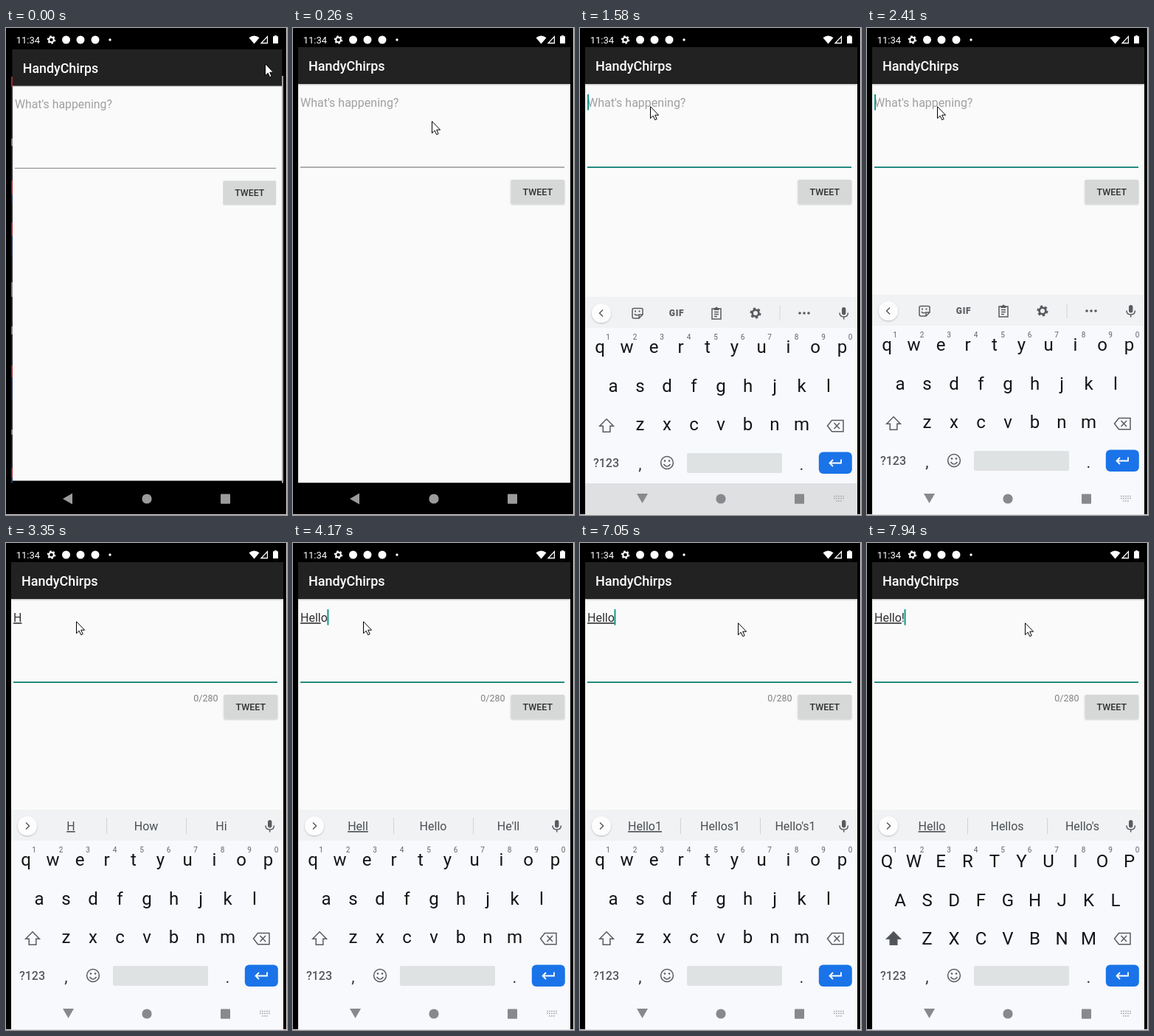
An HTML page that plays this animation: 381x661 px, repeating every 8000 ms.

```html
<!DOCTYPE html>
<html lang="en">
<head>
<meta charset="utf-8">
<title>Composing a post</title>
<style>
html, body { margin: 0; width: 100%; height: 100%; overflow: hidden; background: #000; }
svg { display: block; width: 381px; height: 661px; font-family: Roboto, sans-serif; }
.mid { text-anchor: middle; }
.line { fill: none; stroke: #585b5f; stroke-width: 1.5; }
.under { text-decoration: underline 1px #777; }
#letters text { font-size: 24px; fill: #131416; }
#digits text { font-size: 10px; fill: #5f6368; }
#words text { font-size: 16px; fill: #4b4e52; }
</style>
</head>
<body>
<svg viewBox="0 0 381 661">
  <defs>
    <filter id="shade" x="-20%" y="-20%" width="140%" height="150%">
      <feDropShadow dx="0" dy="1" stdDeviation="0.8" flood-opacity=".25"/>
    </filter>
    <clipPath id="panel"><path d="M7 340H376V618H7Z"/></clipPath>
    <g id="gear" fill="none" stroke="currentColor">
      <circle r="4.4" stroke-width="2.8"/>
      <circle r="6.4" stroke-width="2.2" pathLength="12" stroke-dasharray="1 1"/>
    </g>
  </defs>

  <rect width="381" height="661"/>
  <path d="M380.5 0V661M0 660.5H381" stroke="#e6dde0"/>

  <g id="behind">
    <path d="M375 65V630" stroke="#a3a3a3" stroke-width="2"/>
    <path d="M8 80V614" stroke="#25272b" stroke-width="2"/>
    <path d="M8 66V80M8 207V226M8 264V282M8 458V474M8 597V610" stroke="#9c2630" stroke-width="2"/>
    <path d="M8 226V238M8 282V310M8 474V504M8 610V630" stroke="#1d3260" stroke-width="2"/>
    <path d="M8 150V160M8 345V365M8 405V416M8 545V552" stroke="#77797d" stroke-width="2"/>
  </g>

  <g id="screen">
    <path d="M7 26H376V617.5H7Z" fill="#fafafa"/>
    <path d="M7 26H376V76H7Z" fill="#212121" filter="url(#shade)"/>
    <text x="21" y="58.3" font-size="18" font-weight="500" fill="#fff">HandyChirps</text>
    <text id="hint" x="10" y="107" font-size="16" fill="#a0a0a0">What's happening?</text>
    <text id="entry" x="10" y="107" font-size="16" fill="#303030"><tspan id="marked" class="under"></tspan><tspan id="plain"></tspan></text>
    <path id="rule" d="M10 189H368"/>
    <rect id="caret" y="90" width="2" height="21.5" fill="#12988a"/>
    <text id="count" x="287.5" y="214.5" font-size="12.5" text-anchor="end" fill="#808080">0/280</text>
    <rect x="295.5" y="206" width="72.5" height="32.5" rx="1.5" fill="#d6d7d7" filter="url(#shade)"/>
    <text class="mid" x="331.8" y="227" font-size="12.5" font-weight="500" fill="#303030">TWEET</text>
  </g>

  <g fill="#fff">
    <text x="13.7" y="20.6" font-size="13">11:34</text>
    <use href="#gear" transform="translate(61.5 16) scale(.76)" color="#fff"/>
    <circle cx="81.5" cy="16" r="5.5"/><circle cx="101" cy="16" r="5.5"/><circle cx="121" cy="16" r="5.5"/>
    <circle cx="141" cy="16" r="1.7"/>
    <path d="M329.5 13.2Q336.5 8 343.5 13.2L336.5 21.5Z"/>
    <path d="M346 20.5H354.4V11.6Z" fill="none" stroke="#fff" stroke-width="1.3"/>
    <path d="M364 10H367V11.3H369V21H362V11.3H364Z"/>
  </g>

  <rect id="navBack" x="7" y="617.5" width="369" height="42.5"/>
  <g id="board" clip-path="url(#panel)">
    <g id="keys">
      <path d="M7 362H376V404H7Z" fill="#f0f2f3"/>
      <path d="M7 404H376V620H7Z" fill="#f8f9fc"/>
      <circle cx="29" cy="384" r="13" fill="#fdfdfe" filter="url(#shade)"/>
      <path id="chevron" class="line"/>
      <g id="tools" color="#585b5f">
        <path class="line" d="M73 377.5H83Q85 377.5 85 379.5V386L80 391H73Q71 391 71 389V379.5Q71 377.5 73 377.5ZM85 386H80V391M74 385Q76 388 79 386"/>
        <path d="M74 380.5h2v2h-2zM79.5 380.5h2v2h-2z" fill="#585b5f"/>
        <text class="mid" x="131" y="388.3" font-size="12" font-weight="800" letter-spacing=".7" fill="#585b5f">GIF</text>
        <path class="line" d="M179 378H191V392H179ZM182 382.5H188M182 385.5H188M182 388.5H186"/>
        <path d="M181.5 377H183Q185 374 187 377H188.5V380H181.5Z" fill="#585b5f"/>
        <use href="#gear" x="238" y="384"/>
        <path d="M271 374V394" stroke="#d3d5d8"/>
        <g fill="#585b5f"><circle cx="298" cy="384" r="1.8"/><circle cx="304" cy="384" r="1.8"/><circle cx="310" cy="384" r="1.8"/></g>
      </g>
      <g id="words">
        <path d="M136.5 373V395M244.5 373V395" stroke="#d0d3d6"/>
        <text class="mid under" x="88" y="390"></text>
        <text class="mid" x="190" y="390"></text>
        <text class="mid" x="292" y="390"></text>
      </g>
      <rect x="355" y="376" width="5.4" height="10.5" rx="2.7" fill="#585b5f"/>
      <path class="line" d="M352 383.5Q352 389 357.7 389Q363.4 389 363.4 383.5M357.7 389V392.5"/>
      <g id="letters"></g>
      <g id="digits"></g>
      <path id="shift" class="line" d="M36 527.8L45.3 537.3H40.8V545.3H31.2V537.3H26.7Z"/>
      <path class="line" d="M335.5 537L341.5 529.5H357V544.7H341.5ZM344.5 533L352 541M352 533L344.5 541"/>
      <text class="mid" x="35.5" y="593" font-size="16" font-weight="500" fill="#55585c">?123</text>
      <text class="mid" x="81.5" y="596" font-size="22" fill="#333">,</text>
      <text class="mid" x="300.5" y="597" font-size="22" fill="#333">.</text>
      <circle class="line" cx="118" cy="587" r="8.4"/>
      <path class="line" d="M113.5 589Q118 595 122.5 589"/>
      <g fill="#585b5f"><circle cx="115" cy="584.5" r="1.3"/><circle cx="121" cy="584.5" r="1.3"/></g>
      <rect x="145" y="574" width="129" height="27" rx="2" fill="#dfe2e3"/>
      <rect x="323.8" y="572.6" width="45" height="29.5" rx="6" fill="#1a73e8"/>
      <path d="M354 582.5V587.5H339M343 583L338.5 587.5L343 592" fill="none" stroke="#fff" stroke-width="1.8"/>
    </g>
  </g>

  <g id="nav">
    <path id="back"/>
    <circle cx="191" cy="639" r="6.6"/>
    <rect x="291" y="632.5" width="13" height="13.2" rx=".8"/>
    <path id="switcher" d="M344 635.5H358M344 638.5H358M347 642H355" fill="none" stroke="#a9abae" stroke-width="1.6" stroke-dasharray="1.8 1.2"/>
  </g>

  <path id="pointer" d="M.5 .7V16.7L4.2 13.2L6.7 18.7L9.2 17.6L6.7 12.2H11.6Z" fill="#fff" stroke="#000"/>
</svg>

<script>
const LOOP = 8000;
const $ = id => document.getElementById(id);
const show = (id, on) => $(id).style.display = on ? '' : 'none';
const set = (id, attrs) => { for (const k in attrs) $(id).setAttribute(k, attrs[k]); };

const PITCH = 36.5;
const LOWER_LIFT = 1.8;
const ROWS = [['qwertyuiop', 27, 440], ['asdfghjkl', 45, 492.5], ['zxcvbnm', 81.5, 545]];
const glyph = (c, x, y) => `<text class="mid" x="${x}" y="${y}">${c}</text>`;
$('letters').innerHTML = ROWS.map(([chars, x, y]) =>
  [...chars].map((c, i) => glyph(c, x + i * PITCH, y)).join('')).join('');
$('digits').innerHTML = [...'1234567890'].map((c, i) => glyph(c, 38 + i * PITCH, 419.7)).join('');
const letters = [...$('letters').children];
const words = [...document.querySelectorAll('#words text')];

// Each entry changes part of the state from its time on.
const TIMELINE = [
  [0, { scale: .9895, pointer: [351, 48], marked: '', plain: '', caret: false, focus: false,
        drop: null, navFill: '#000', words: null, caps: false }],
  [140, { scale: .996, pointer: [262, 88] }],
  [260, { scale: 1, pointer: [188, 126] }],
  [410, { pointer: [172, 144] }],
  [560, { pointer: [146, 134] }],
  [680, { pointer: [118, 119] }],
  [800, { pointer: [101, 109] }],
  [920, { pointer: [95, 106] }],
  [1180, { focus: true }],
  [1460, { caret: true, drop: 36, navFill: '#8d8e90' }],
  [1580, { drop: 3, navFill: '#dfe0e2' }],
  [1730, { drop: 0, navFill: '#f8f9fc' }],
  [1880, { caret: false }],
  [2410, { caret: true }],
  [2820, { marked: 'H', words: ['H', 'How', 'Hi'] }],
  [3350, { caret: false }],
  [3610, { plain: 'e', caret: true }],
  [3730, { marked: 'He', plain: 'l' }],
  [3870, { marked: 'Hel', plain: 'l', words: ['He', 'Hey', 'Her'] }],
  [4020, { words: ['Hel', 'Hello', 'Help'] }],
  [4170, { marked: 'Hell', plain: 'o', words: ['Hell', 'Hello', "He'll"] }],
  [4420, { marked: 'Hello', plain: '', words: ['Hello', 'Hellos', "Hello's"] }],
  [4850, { caret: false }],
  [5430, { caret: true }],
  [5850, { plain: '1' }],
  [6010, { marked: 'Hello1', plain: '', words: ['Hello1', 'Hellos1', "Hello's1"] }],
  [6400, { pointer: [152, 118] }],
  [6550, { pointer: [204, 111], caret: false }],
  [6680, { pointer: [214, 108] }],
  [7050, { marked: 'Hello', caret: true }],
  [7170, { words: ['Hello', 'Hellos', "Hello's"] }],
  [7820, { plain: '!' }],
  [7940, { caps: true }]
];

const stateAt = t => Object.assign({}, ...TIMELINE.filter(e => e[0] <= t).map(e => e[1]));

function draw(s) {
  const typing = s.drop !== null;
  set('screen', { transform: `translate(191.5 321.8) scale(${s.scale}) translate(-191.5 -321.8)` });
  show('behind', s.scale < 1);
  set('pointer', { transform: `translate(${s.pointer})` });

  $('marked').textContent = s.marked;
  $('plain').textContent = s.plain;
  const empty = !(s.marked + s.plain);
  show('hint', empty);
  show('count', !empty);
  set('caret', { x: empty ? 10 : 9.6 + $('entry').getComputedTextLength() });
  show('caret', s.caret);
  set('rule', s.focus ? { stroke: '#258a7e', 'stroke-width': 2 } : { stroke: '#959595', 'stroke-width': 1.4 });

  show('board', typing);
  show('switcher', typing);
  set('keys', { transform: `translate(0 ${s.drop || 0})` });
  set('navBack', { fill: s.navFill });
  set('nav', { fill: typing ? '#87898c' : '#9b9b9b' });
  set('back', { d: typing ? 'M77 632H92L84.5 645Z' : 'M90 631.5V646.5L77 639Z' });

  show('tools', !s.words);
  show('words', s.words);
  set('chevron', { d: s.words ? 'M27 379.5L31.5 384L27 388.5' : 'M31 379.5L26.5 384L31 388.5' });
  if (s.words) words.forEach((el, i) => el.textContent = s.words[i]);
  letters.forEach(el => el.textContent = s.caps ? el.textContent.toUpperCase() : el.textContent.toLowerCase());
  set('letters', { transform: `translate(0 ${s.caps ? 0 : -LOWER_LIFT})` });
  $('shift').style.fill = s.caps ? '#505357' : 'none';
}

const start = performance.now();
function tick() {
  draw(stateAt((performance.now() - start) % LOOP));
  requestAnimationFrame(tick);
}
tick();
</script>
</body>
</html>
```
